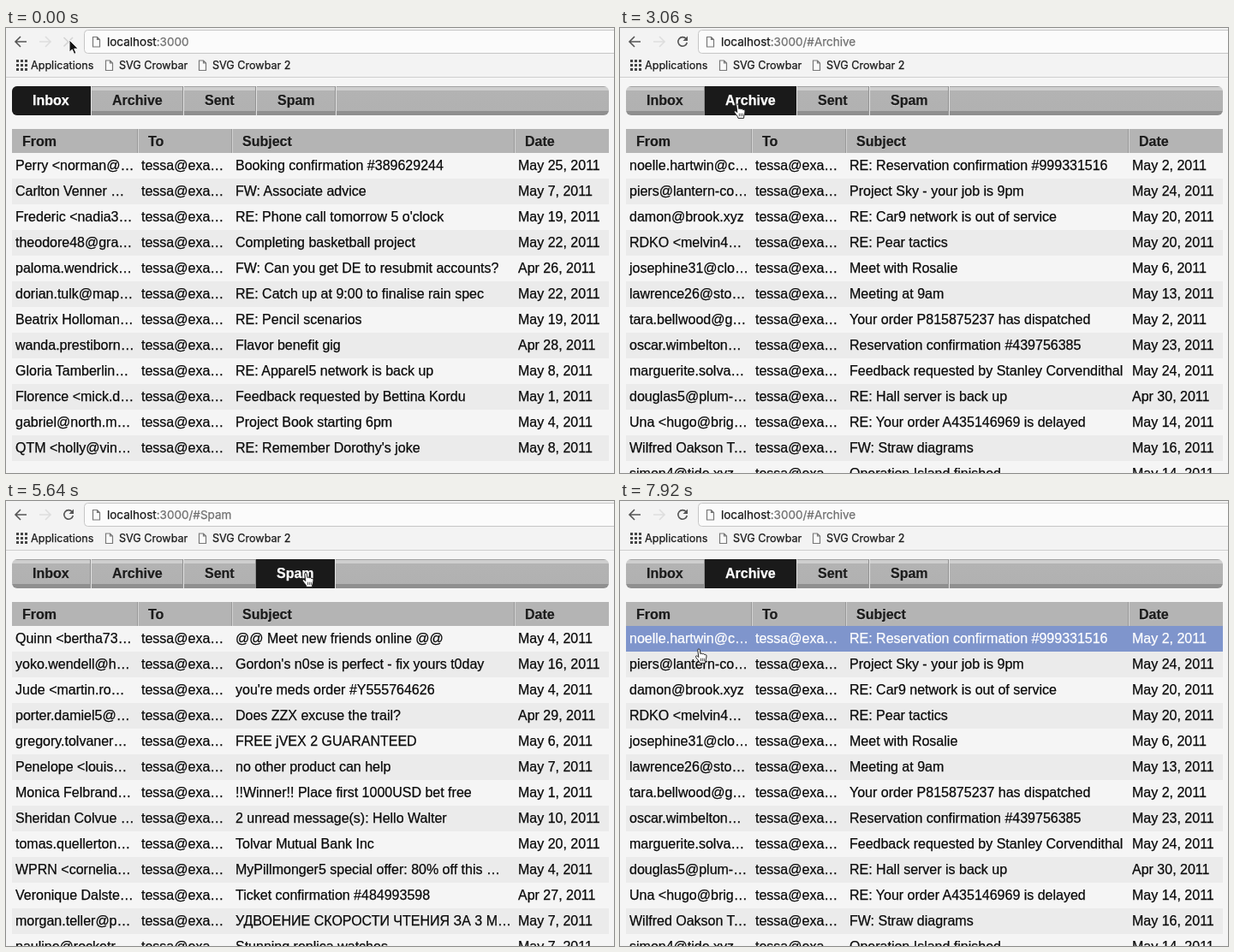
Animation, 710 px wide and 520 px high, one loop 8000 ms. Source, as an HTML page:

```html
<!DOCTYPE html>
<html lang="en">
<head>
<meta charset="utf-8">
<title>Mail</title>
<style>
html, body { margin: 0; width: 100%; height: 100%; overflow: hidden; }
#stage { position: relative; width: 710px; height: 520px; overflow: hidden; background: #f5f5f5; color: #0a0a0a;
  font: 16px "Liberation Sans", Arial, sans-serif; white-space: nowrap; cursor: default; -webkit-text-stroke: .25px; }
#chrome { position: absolute; left: 0; top: 0; width: 710px; height: 57px; background: #f3f3f3; border-bottom: 1px solid #cfcfcf; }
#chrome svg { position: absolute; left: 0; top: 0; }
#chrome span { position: absolute; top: 36px; font: 12.6px/16px Inter, sans-serif; color: #1a1a1a; }
#chrome #url { left: 118px; top: 8px; font-size: 13.5px; }
#url i { font-style: normal; color: #707070; }

#tabs { position: absolute; left: 7px; top: 68px; width: 697px; height: 34px; display: flex; overflow: hidden;
  border-radius: 6px; font-weight: bold; line-height: 34px; color: #1c1c1c;
  background: linear-gradient(#a2a2a2 0 1px, #cecece 1px 5px, #b3b3b3 5px, #b1b1b1 29px, #8f8f8f 29px); }
#tabs div { flex: none; text-indent: 24px; border-left: 1px solid #e2e2e2; box-shadow: inset -1px 0 #929292;
  text-shadow: 0 1px #d4d4d4; }
#tabs div:first-child { border: 0; }
#tabs div:last-child { flex: 1; box-shadow: none; }
#tabs .on { border: 0; box-shadow: none; background: #1a1a1a; color: #fff; text-shadow: none; }

.row { display: grid; grid-template-columns: 147px 110px 330px 110px; width: 697px; height: 30px; line-height: 30px; }
.row b, .row span { box-sizing: border-box; overflow: hidden; text-overflow: ellipsis; padding: 0 4px; }
#head { position: absolute; left: 7px; top: 118px; height: 28px; background: #b4b4b4; color: #1c1c1c; }
#head b { height: 28px; padding-left: 12px; text-shadow: 0 1px #d6d6d6; }
#head b + b { padding-left: 11px; border-left: 1px solid #d2d2d2; }
#head b:not(:last-child) { box-shadow: inset -1px 0 #999; }
.list { position: absolute; left: 7px; top: 146px; visibility: hidden; }
.list.on { visibility: visible; }
.list .row:nth-child(even) { background: #ebebeb; }
.list .row.hover { background: #7f95cc; color: #fff; }
#cursor { position: absolute; left: 0; top: 0; overflow: visible; }
</style>
</head>
<body>
<div id="stage">
  <div id="chrome">
    <svg width="710" height="57" fill="none" stroke="#555" stroke-width="1.6">
      <rect x="91.5" y="2.5" width="640" height="27" rx="4" fill="#fbfbfb" stroke="#c6c6c6" stroke-width="1"/>
      <path d="M24 16H11.5M17 10l-6 6 6 6"/>
      <path d="M39 16h12.5M46 10l6 6-6 6" stroke="#dedede"/>
      <path id="stop" d="M67.500 11l10.500 10.500M78 11l-10.500 10.500" stroke="#d4d4d4"/>
      <g id="reload"><path d="M77.200 12.500A5.300 5.300 0 1 0 78.300 17"/><path d="M79 9.500v5.500h-5.500z" fill="#555" stroke="none"/></g>
      <g stroke="#777" stroke-width="1.200" fill="#fafafa">
        <path id="page" d="M101.500 10.500h5l3 3v8.500h-8zM106.500 10.500v3h3"/>
        <use href="#page" x="15" y="27.500"/><use href="#page" x="124" y="27.500"/>
      </g>
      <path d="M12 38.500h13M12 43.500h13M12 48.500h13" stroke="#444" stroke-width="3" stroke-dasharray="3 2"/>
    </svg>
    <span id="url">localhost<i>:3000</i></span>
    <span style="left:29px">Applications</span>
    <span style="left:132px">SVG Crowbar</span>
    <span style="left:241px">SVG Crowbar 2</span>
  </div>
  <div id="tabs">
    <div style="width:92px">Inbox</div><div style="width:107px">Archive</div><div style="width:84px">Sent</div><div style="width:92px">Spam</div><div></div>
  </div>
  <div id="head" class="row"><b>From</b><b>To</b><b>Subject</b><b>Date</b></div>
  <svg id="cursor" width="16" height="18">
    <path id="arrow" d="M0 0V14.200L3.300 11.200 5.600 16.400 8 15.400 5.700 10.300H10.200Z" fill="#111" stroke="#fff" stroke-width="1"/>
    <g id="hand" transform="translate(-4.200 -.3)" stroke="#222" stroke-width="1" stroke-linejoin="round">
      <path fill="#fff" d="M3 1.400C3-.3 5.300-.3 5.500 1.400L6.100 6C6.600 5 8.200 5.100 8.500 6.300 9.100 5.400 10.700 5.700 10.900 7 11.700 6.300 13.200 6.800 13.200 8.200 13.300 11 12 13 11.700 16.700H5.200C4.700 14 2.500 12.600.8 9.900 0 8.400 1.600 7.600 2.800 8.700L4 9.900Z"/>
      <path fill="none" stroke-width=".8" d="M6.500 11v3.500M8.500 11v3.500M10.500 11v3.500"/>
    </g>
  </svg>
</div>
<script>
const ME = 'tessa@example.xyz';
// each line: correspondent | subject | date
const mail = [`
Perry <norman@slate.xyz>|Booking confirmation #389629244|May 25
Carlton Venner Odwick|FW: Associate advice|May 7
Frederic <nadia35@loft.xyz>|RE: Phone call tomorrow 5 o'clock|May 19
theodore48@granite.xyz|Completing basketball project|May 22
paloma.wendrick@moss.xyz|FW: Can you get DE to resubmit accounts?|Apr 26
dorian.tulk@maplerow.xyz|RE: Catch up at 9:00 to finalise rain spec|May 22
Beatrix Hollomanders|RE: Pencil scenarios|May 19
wanda.prestiborne@fern.xyz|Flavor benefit gig|Apr 28
Gloria Tamberlinwood|RE: Apparel5 network is back up|May 8
Florence <mick.dun@tin.xyz>|Feedback requested by Bettina Kordu|May 1
gabriel@north.moor.xyz|Project Book starting 6pm|May 4
QTM <holly@vinehouse.xyz>|RE: Remember Dorothy's joke|May 8`, `
noelle.hartwin@coast.xyz|RE: Reservation confirmation #999331516|May 2
piers@lantern-court.xyz|Project Sky - your job is 9pm|May 24
damon@brook.xyz|RE: Car9 network is out of service|May 20
RDKO <melvin42@hill.xyz>|RE: Pear tactics|May 20
josephine31@cloud.xyz|Meet with Rosalie|May 6
lawrence26@stone.xyz|Meeting at 9am|May 13
tara.bellwood@grove.xyz|Your order P815875237 has dispatched|May 2
oscar.wimbelton4@reed.xyz|Reservation confirmation #439756385|May 23
marguerite.solvan@ash.xyz|Feedback requested by Stanley Corvendithal|May 24
douglas5@plum-field.xyz|RE: Hall server is back up|Apr 30
Una <hugo@bright.xyz>|RE: Your order A435146969 is delayed|May 14
Wilfred Oakson Tarrel|FW: Straw diagrams|May 16
simon4@tide.xyz|Operation Island finished|May 14`, `
noelle.hartwin@coast.xyz|RE: Pear tactics|May 3
Wilfred Oakson Tarrel|Straw diagrams|May 15
damon@brook.xyz|Meeting at 9am|May 12
theodore48@granite.xyz|RE: Completing basketball project|May 22
lawrence26@stone.xyz|RE: Associate advice|May 8
Beatrix Hollomanders|Pencil scenarios|May 18
tara.bellwood@grove.xyz|RE: Meeting at 9am|May 13
gabriel@north.moor.xyz|RE: Project Book starting 6pm|May 4
josephine31@cloud.xyz|FW: Hall server is back up|May 1
Gloria Tamberlinwood|Flavor benefit gig|Apr 28
piers@lantern-court.xyz|RE: Project Sky - your job is 9pm|May 24
simon4@tide.xyz|Phone call tomorrow 5 o'clock|May 19
douglas5@plum-field.xyz|Catch up at 9:00|May 21`, `
Quinn <bertha73@sun.xyz>|@@ Meet new friends online @@|May 4
yoko.wendell@harbor.xyz|Gordon's n0se is perfect - fix yours t0day|May 16
Jude <martin.ro@elm.xyz>|you're meds order #Y555764626|May 4
porter.damiel5@hut.xyz|Does ZZX excuse the trail?|Apr 29
gregory.tolvaner@ivy.xyz|FREE jVEX 2 GUARANTEED|May 6
Penelope <louis@oak.xyz>|no other product can help|May 7
Monica Felbrandson|!!Winner!! Place first 1000USD bet free|May 1
Sheridan Colvue Marden|2 unread message(s): Hello Walter|May 10
tomas.quellerton@bay.xyz|Tolvar Mutual Bank Inc|May 20
WPRN <cornelia@lea.xyz>|MyPillmonger5 special offer: 80% off this month only|May 4
Veronique Dalsten Ro|Ticket confirmation #484993598|Apr 27
morgan.teller@pond.xyz|УДВОЕНИЕ СКОРОСТИ ЧТЕНИЯ ЗА 3 МЕСЯЦА|May 7
pauline@rocketry.xyz|Stunning replica watches|May 7`];

// [time, url hash, tab, list]
const scenes = [
  [0, '', 0, 0], [1980, '/#Inbox', 0, 0],
  [3000, '/#Archive', 1, 0], [3060, '/#Archive', 1, 1],
  [4500, '/#Sent', 2, 1], [4560, '/#Sent', 2, 2],
  [5640, '/#Spam', 3, 3], [6600, '/#Archive', 1, 1]
];
// [start, steps, x, y]
const moves = [
  [600, 8, 69, 87], [2340, 5, 137, 89], [3540, 6, 242, 89],
  [4860, 4, 350, 84], [6000, 4, 194, 85], [7200, 13, 92, 173]
];
const LOOP = 8000, STEP = 60;

const $ = id => document.getElementById(id);
const show = (el, on) => el.style.display = on ? '' : 'none';

const lists = mail.map((text, n) => {
  const list = document.createElement('div');
  list.className = 'list';
  for (const line of text.trim().split('\n')) {
    const [who, subject, date] = line.split('|');
    const row = document.createElement('div');
    row.className = 'row';
    const people = n === 2 ? [ME, who] : [who, ME];
    for (const cell of [...people, subject, date + ', 2011']) {
      row.appendChild(document.createElement('span')).textContent = cell;
    }
    list.appendChild(row);
  }
  $('stage').insertBefore(list, $('cursor'));
  return list;
});
const tabs = [...$('tabs').children];
const port = $('url').querySelector('i');

function pointer(t) {
  let x = 74, y = 14;
  for (const [start, steps, toX, toY] of moves) {
    if (t < start) break;
    const p = Math.min(1, (Math.floor((t - start) / STEP) + 1) / steps);
    const e = p * p * (3 - 2 * p);
    x += (toX - x) * e;
    y += (toY - y) * e;
  }
  return [x, y];
}

function draw(t) {
  const [, hash, tab, current] = scenes.filter(s => s[0] <= t).pop();
  const [x, y] = pointer(t);
  const hover = Math.floor((y - 146) / 30);
  const link = hover >= 0 || (y >= 68 && y < 102 && x < 385);
  port.textContent = ':3000' + hash;
  tabs.forEach((el, i) => el.classList.toggle('on', i === tab));
  lists.forEach((el, i) => {
    el.classList.toggle('on', i === current);
    [...el.children].forEach((row, r) => row.classList.toggle('hover', r === hover));
  });
  show($('stop'), t < 600);
  show($('reload'), t >= 600);
  show($('arrow'), !link);
  show($('hand'), link);
  $('cursor').style.transform = `translate(${x}px, ${y}px)`;
}

const begin = performance.now();
function tick() {
  draw((performance.now() - begin) % LOOP);
  requestAnimationFrame(tick);
}
tick();
</script>
</body>
</html>
```
